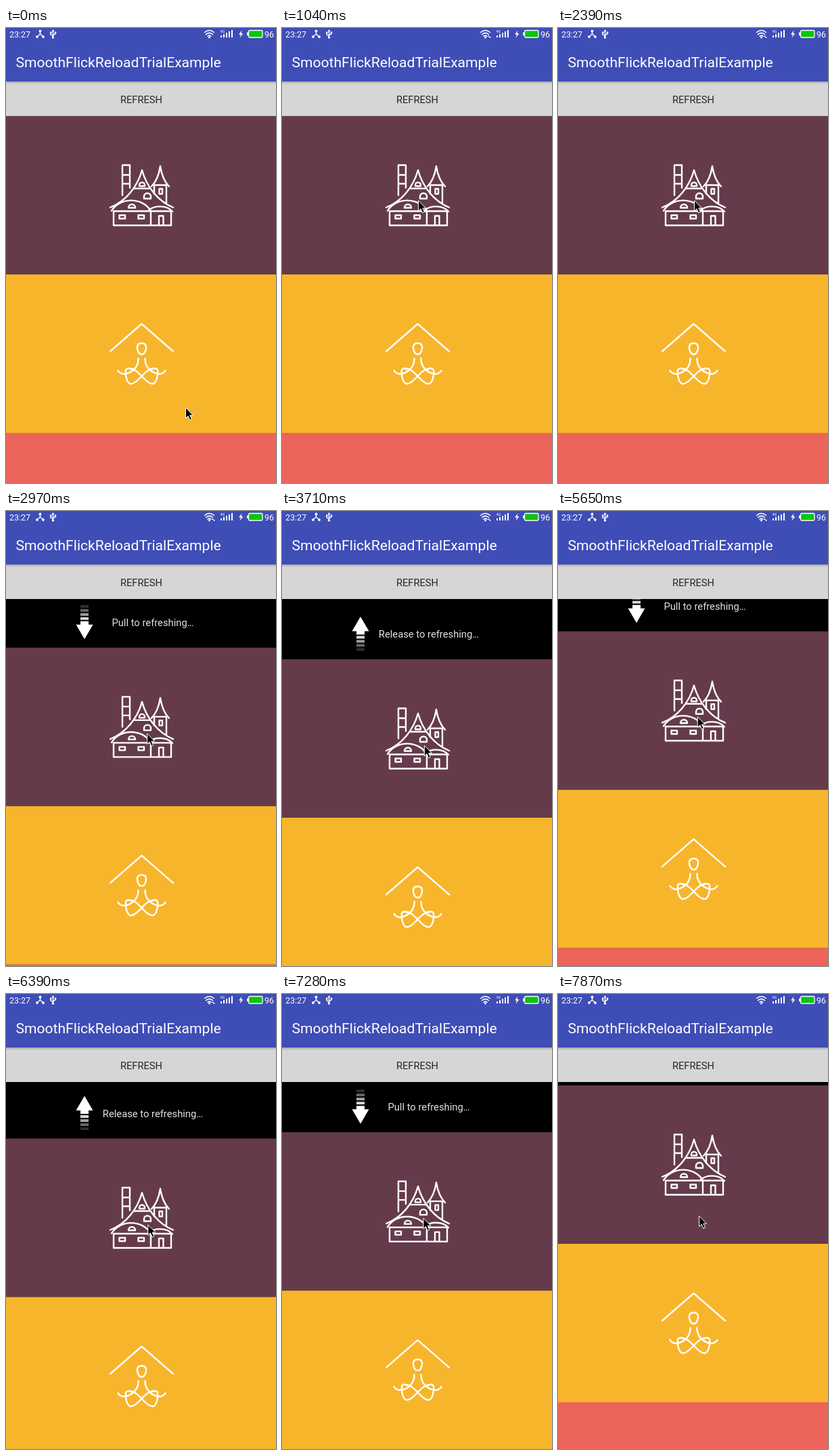
These frames come from a looping animation (399 px wide and 672 px high, 8 s). An HTML page:

```html
<!DOCTYPE html>
<html lang="en">
<head>
<meta charset="utf-8">
<title>Pull to refresh</title>
<style>
  html, body { margin: 0; width: 100%; height: 100%; overflow: hidden; background: #000; }
  svg { display: block; width: 399px; height: 672px; font-family: Roboto, sans-serif; }
  .line { fill: none; stroke: #fff; stroke-width: 2.4; stroke-linecap: round; stroke-linejoin: round; }
  .thin { fill: none; stroke: #fff; stroke-width: 1.5; }
</style>
</head>
<body>
<svg viewBox="0 0 399 672">
  <defs>
    <linearGradient id="shade" x2="0" y2="1">
      <stop offset="0" stop-color="#a6a7ab"/>
      <stop offset="1" stop-color="#d6d6d6"/>
    </linearGradient>
    <clipPath id="view"><path d="M0 130H399V672H0z"/></clipPath>
  </defs>

  <g clip-path="url(#view)">
    <rect y="130" width="399" height="542"/>
    <g id="header">
      <g id="arrow" fill="#fff">
        <path d="M110 33h12v5h6.5L116 59.500 103.500 38h6.500z"/>
      </g>
      <text id="label" x="217" y="40" font-size="14.75" fill="#e2e2e2" text-anchor="middle"></text>
    </g>

    <g id="list">
      <rect y="130" width="399" height="234" fill="#653b4c"/>
      <rect y="364" width="399" height="234" fill="#f7b52c"/>
      <rect y="598" width="399" height="234" fill="#ed645a"/>
      <g class="line">
        <!-- house -->
        <path d="M172 247V202.500H183V236M172 217H183M172 230H183"/>
        <path d="M154 265C177 256 194 235 201 210C208 235 225 256 247 265"/>
        <path d="M190 237H212M197 233.500V232A4 4 0 0 1 205 232V233.500Z"/>
        <path d="M215 234C222 227 226 217 228 204C230 217 234 227 241 234M219 232H237M219 232V245M237 232V258"/>
        <path d="M226.500 237.500H231V245H226.500Z"/>
        <path d="M204 252V249A5 5 0 0 1 214 249V252Z"/>
        <path d="M156 270C168 250 201 249 214 270M211 269C219 262 237 261 246 271"/>
        <path d="M181 265.500A5 5 0 0 1 191 265.500Z"/>
        <path d="M159 270.500H244V291.500H159ZM214 270.500V291.500"/>
        <path d="M167.500 276.500H176V281.500H167.500ZM195.500 276.500H204V281.500H195.500ZM226 291V277.500H232.500V291"/>
        <!-- meditation -->
        <path d="M154 477.500L200.500 437L247 477.500"/>
        <path d="M200.500 465.500C206 465.500 207.500 469 207 473C206 479 203.500 482 200.500 482C197.500 482 195 479 194 473C193.500 469 195 465.500 200.500 465.500Z"/>
        <path id="half" d="M195.500 488C196 502 184 511 173 511Q168 510 165.500 506M183 503C196 503 206 526 217 525.500C223 524 225 511 224 505Q222 501 215 504"/>
        <use href="#half" transform="matrix(-1 0 0 1 401 0)"/>
      </g>
    </g>
  </g>

  <rect y="79" width="399" height="51" fill="#d6d6d6"/>
  <rect y="79" width="399" height="4" fill="url(#shade)"/>
  <text x="200" y="110.500" font-size="14.67" fill="#262626" text-anchor="middle">REFRESH</text>

  <rect width="399" height="79" fill="#3f4db6"/>
  <text x="14.500" y="58" font-size="21.1" fill="#fff">SmoothFlickReloadTrialExample</text>

  <g id="status" fill="#fff">
    <g font-size="12.500">
      <text x="5" y="13.500">23:27</text>
      <text x="382" y="13.500">96</text>
    </g>
    <path class="thin" d="M50.500 4V9L45.500 13M50.500 9L55.500 13"/>
    <circle cx="50.500" cy="4.500" r="1.900"/>
    <circle cx="46" cy="13" r="1.900"/>
    <circle cx="55" cy="13" r="1.900"/>
    <path class="thin" d="M69.500 4V14M66 7V9.500L69.500 12M73 7V8.500L69.500 11"/>
    <path d="M69.500 2L71.500 5H67.500ZM65 5.500h2.500v2.500H65zM71.800 5.500h2.500v2.500h-2.500z"/>
    <circle cx="69.500" cy="14" r="1.700"/>
    <path class="thin" stroke-linecap="round" d="M293.500 6.500Q300.500 .5 307.500 6.500M295.500 9.500Q300.500 5.300 305.500 9.500M298 12.200Q300.500 10 303 12.200"/>
    <circle cx="300.500" cy="14" r="1.400"/>
    <path id="traffic" d="M304 13L305.500 10.800 307 13ZM306 13H309L307.500 15.200Z"/>
    <text x="316.500" y="7" font-size="5.500">4G</text>
    <path d="M348.500 3.500L344 9.500H347L345.500 14.500 350.500 8H347.500Z"/>
    <path d="M356 6.500h2v4.500h-2z"/>
    <rect x="358.500" y="3.500" width="20.500" height="10.500" rx="1.500" fill="#0bc60b" stroke="#fff" stroke-width="1.300"/>
  </g>

  <path id="cursor" d="M.5 .8V16.300L4.100 13 6.700 19.100 9.400 18 6.800 12H11.500Z" stroke="#fff"/>
</svg>

<script>
const LOOP = 8000, TICK = 148.6, LEAD = 12;
const HEADER = 72, RELEASE_AT = 75;
const LET_GO = 52;

const $ = id => document.getElementById(id);
const [header, arrow, label, list, status, traffic, cursor] =
  ['header', 'arrow', 'label', 'list', 'status', 'traffic', 'cursor'].map(id => $(id));

const easeOut = p => 1 - (1 - p) ** 2.8;
const easeInOut = p => (1 - Math.cos(Math.PI * p)) / 2;

// The finger pulls, wavers and lets go.
const DRAGS = [
  { from: 16, to: 25, pull: 89, ease: easeOut },
  { from: 27, to: 39, pull: 47, ease: easeInOut },
  { from: 39, to: 43, pull: 83.5, ease: easeOut },
  { from: 45, to: 51, pull: 71, ease: easeInOut },
  { from: LET_GO, to: LET_GO + 1, pull: 5, ease: easeOut }
];

const progress = (t, from, to) => Math.min(1, Math.max(0, (t - from) / (to - from)));

const pullAt = tick => DRAGS.reduce(
  (at, d) => at + (d.pull - at) * d.ease(progress(tick, d.from, d.to)), 0);

function addBar(parent, x, y, width, height, opacity = 1) {
  const bar = document.createElementNS('http://www.w3.org/2000/svg', 'rect');
  Object.entries({ x, y, width, height, opacity }).forEach(([k, v]) => bar.setAttribute(k, v));
  parent.append(bar);
}
for (let i = 0; i < 4; i++) addBar(arrow, 110, 9 + 6 * i, 12, 4, 0.18 + 0.22 * i);
for (let i = 0; i < 5; i++) addBar(status, 317 + 4 * i, 11 - 2 * i, 2, 3 + 2 * i);

const move = (el, x, y) => el.setAttribute('transform', `translate(${x} ${y})`);

function draw(time) {
  // Like a screen recording, positions change only once per tick.
  const tick = Math.floor((time % LOOP + LEAD) / TICK);
  const pull = pullAt(tick);
  const drag = pullAt(Math.min(tick, LET_GO));
  const away = 1 - easeInOut(progress(tick, 3, 7));
  const ready = pull > RELEASE_AT;

  move(list, 0, pull);
  move(header, 0, 130 + pull - HEADER);
  move(cursor, 201 + 64 * away + 0.1 * drag, 254 + 306 * away + 1.03 * drag);
  arrow.setAttribute('transform', `rotate(${ready ? 180 : 0} 116 34.25)`);
  label.textContent = ready ? 'Release to refreshing…' : 'Pull to refreshing…';
  traffic.style.opacity = tick >= 6 && tick < 48 ? 1 : 0;
}

const start = performance.now();
function loop() {
  draw(performance.now() - start);
  requestAnimationFrame(loop);
}
loop();
</script>
</body>
</html>
```
